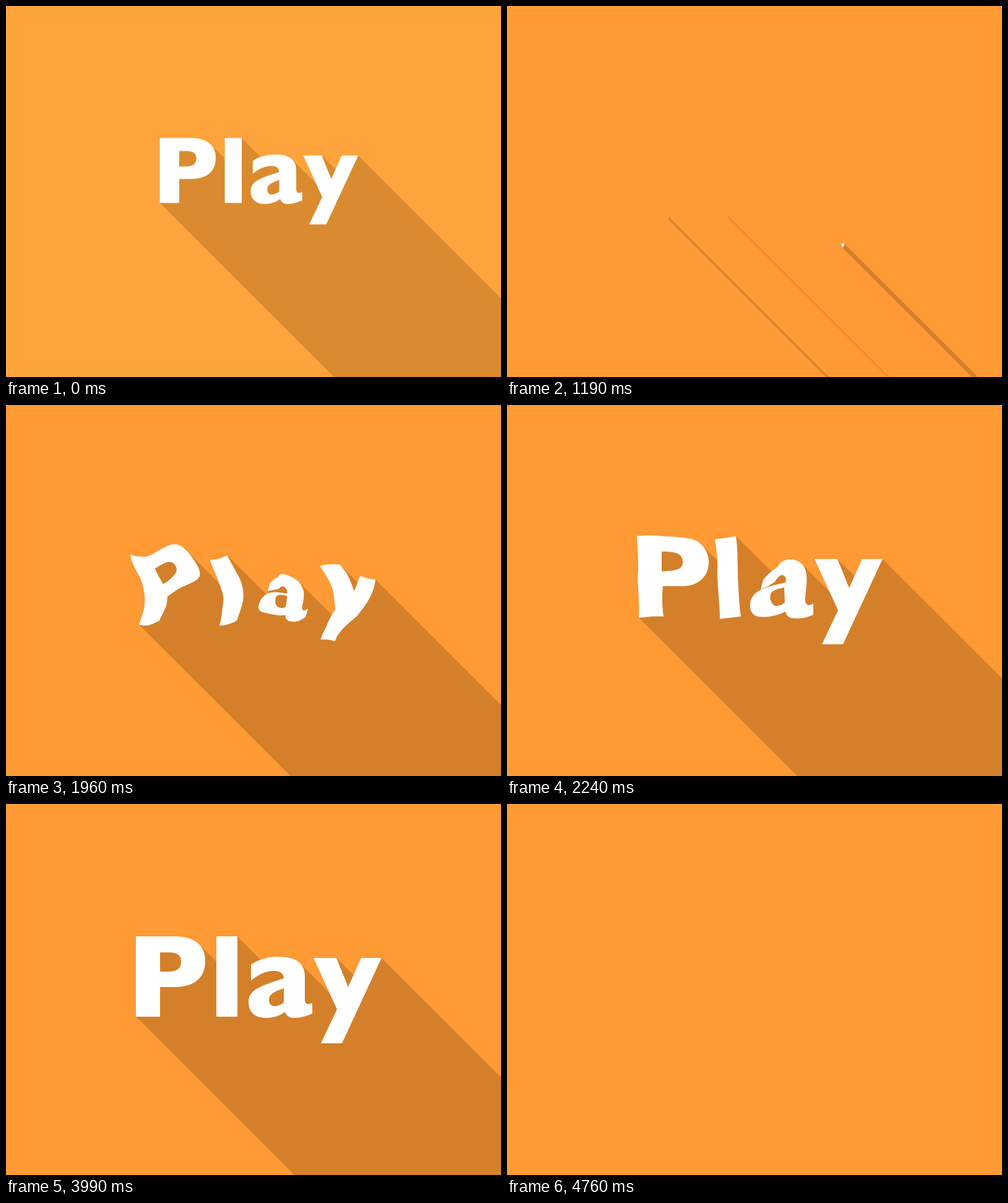
Write an HTML page with a canvas that moves like this. It is 800x600 px and loops after 5250 ms.

```html
<!DOCTYPE html>
<html lang="en">
<head>
<meta charset="utf-8">
<title>Play</title>
<style>
html, body { margin: 0; width: 100%; height: 100%; overflow: hidden; background: #ff9a35; }
canvas { display: block; }
</style>
</head>
<body>
<canvas id="stage" width="800" height="600" role="img" aria-label="Play"></canvas>
<script>
const ctx = document.getElementById('stage').getContext('2d');
const LOOP = 5250, STEP = 70, SAMPLES = 400, REACH = 800;

// Finished outlines; "|" separates the contours of one letter.
const P = 'M210 214H272C304 214 322 228 322 254C322 282 303 296 272 296H249V344H210Z' +
  '|M249 240H262C276 240 283 244 283 255C283 266 276 271 262 271H249Z';
const L = 'M340 214H374V344H340Z';
const A = 'M396 260C408 251 425 247 440 247C470 247 483 258 483 280V316C483 324 487 325 495 322V339' +
  'C485 343 476 346 467 346C458 346 453 343 451 336C442 343 431 346 420 346C402 346 392 336 392 321' +
  'C392 302 405 296 449 282C448 273 443 270 433 270C420 270 407 276 396 286Z' +
  '|M449 298C431 304 425 309 425 317C425 323 429 327 434 327C440 327 445 324 449 321Z';
const Y = 'M497 249H534L553 296L574 249H607L543 387H509L535 332Z';

// Poses of each letter: [time, outline, ease-out towards it, wobble on the way]
const letters = [
  [
    [1190, 'M259 339L260.5 342L260 344Z|M260 341h.01v.01Z'],
    [1680, 'M215 309L221 304L225 306C228 297 236 292 245 293C255 294 261 301 260 309C259 314 257 316 256 318' +
      'C256 324 250 326 245 327C242 330 241 333 242 335C246 336 248 336 251 338C250 342 246 343 241 346L243 354' +
      'C232 354 220 348 216 337C216 332 217 329 219 326C216 323 215 318 215 314Z' +
      '|M230 315C231 309 236 305 240 306C244 308 244 314 241 319C238 323 233 325 231 321Z'],
    [2240, 'M210 212C225 210 240 211 250 212C268 213 285 214 294 216C313 218 326 236 326 254C326 278 308 293 284 293' +
      'L252 293C250 310 251 328 253 342C240 341 226 343 213 344C214 320 212 295 211 280C213 258 211 235 210 212Z' +
      '|M250 237C262 237 285 237 284 254C284 268 268 268 250 269Z', 1, 11],
    [2800, P, 1, 3]
  ], [
    [1190, 'M355 339.5L357 340V341Z'],
    [1680, 'M341 321C344 314 350 311 357 311C363 311 368 315 370 319C375 321 377 325 377 334C377 345 375 354 373 362' +
      'C368 359 362 355 359 349C355 349 351 355 347 356L348 346L335 341C337 336 339 329 341 321Z'],
    [2240, 'M336 217C348 216 360 214 370 212C374 240 372 270 374 295C375 315 376 330 378 342L344 346' +
      'C344 320 340 295 340 270C341 250 338 232 336 217Z', 1, 9],
    [2800, L, 1, 3]
  ], [
    [1400, 'M441 338h.01v.01Z|M441 338h.01v.01Z'],
    [1680, 'M430 338C431 330 436 327 441 327C445 327 448 329 449 331L453 337C452 341 449 341 448 344' +
      'C444 349 440 350 436 348C431 347 430 342 430 338Z|M441 338h.01v.01Z'],
    [2240, 'M414 283C420 275 428 268 437 262C440 255 450 248 460 250C475 251 483 262 484 275C486 290 481 305 482 318' +
      'C484 325 490 325 495 321V339C485 344 475 346 465 345C457 345 452 342 450 334C446 336 440 339 434 340' +
      'C425 343 410 344 402 341C394 337 391 328 394 316C397 307 404 302 410 299C425 292 438 290 450 287' +
      'C452 280 450 276 445 275C440 275 436 281 433 286C426 290 420 295 410 298Z' +
      '|M448 295C440 297 428 299 426 306C424 314 427 322 434 325C440 325 445 323 449 319Z', 1, 8],
    [2800, A, 1, 3]
  ], [
    [1190, 'M540 384H545V387L542 391Z'],
    [1680, 'M541 305C548 307 559 308 570 303C568 318 562 328 558 340L564 349C560 352 558 353 558 357' +
      'C557 372 549 387 545 399C537 398 533 394 527 396L515 397C520 384 530 372 534 361C527 360 522 353 522 345' +
      'C523 335 530 331 535 329C535 321 540 314 541 305Z'],
    [2240, Y, 1, 6],
    [2800, 'M493 252C506 251 518 250 529 248C536 265 545 280 553 295C562 278 570 263 576 249H607' +
      'C600 265 595 278 589 290C572 325 560 355 545 387L511 388C518 370 528 350 535 332C527 305 508 278 493 252Z', 1],
    [3990, Y]
  ]
];

// Outline string -> contours of evenly spaced points
function sample(outline) {
  return outline.split('|').map(d => {
    const path = document.createElementNS('http://www.w3.org/2000/svg', 'path');
    path.setAttribute('d', d);
    const len = path.getTotalLength();
    return Array.from({ length: SAMPLES }, (_, i) => {
      const p = path.getPointAtLength(len * i / SAMPLES);
      return [p.x, p.y];
    });
  });
}
for (const keys of letters) for (const key of keys) key[1] = sample(key[1]);

function contoursAt(keys, t) {
  if (t < keys[0][0]) return [];
  const i = keys.findIndex(k => k[0] > t);
  if (i < 0) return keys[keys.length - 1][1];
  const [t0, from] = keys[i - 1], [t1, to, ease, wobble = 0] = keys[i];
  const u = (t - t0) / (t1 - t0), v = ease ? u * (2 - u) : u;
  const amp = wobble * Math.sin(Math.PI * u);
  return to.map((contour, c) => contour.map(([x1, y1], n) => {
    const [x0, y0] = from[c][n];
    const x = x0 + (x1 - x0) * v, y = y0 + (y1 - y0) * v;
    return [x + amp * Math.sin(y / 23 + 1), y + amp * Math.sin(x / 19 + 2)];
  }));
}

function polygon(points) {
  points.forEach(([x, y], i) => i ? ctx.lineTo(x, y) : ctx.moveTo(x, y));
  ctx.closePath();
}

// Sweeps every edge down the diagonal, all quads wound the same way.
function drawShadow(contours, color) {
  ctx.beginPath();
  for (const pts of contours) pts.forEach((a, i) => {
    let b = pts[(i + 1) % pts.length];
    if (b[0] - a[0] < b[1] - a[1]) [a, b] = [b, a];
    polygon([a, b, [b[0] + REACH, b[1] + REACH], [a[0] + REACH, a[1] + REACH]]);
  });
  ctx.fillStyle = color;
  ctx.fill();
}

function drawWord(contours, shadow) {
  drawShadow(contours, shadow);
  ctx.beginPath();
  contours.forEach(polygon);
  ctx.fillStyle = '#fff';
  ctx.fill('evenodd');
}

function fillStage(color) {
  ctx.fillStyle = color;
  ctx.fillRect(0, 0, 800, 600);
}

function draw(t) {
  const intro = t < 350;
  fillStage(intro ? '#ffa43c' : '#ff9a35');
  if (t >= 4760) return;
  const contours = letters.flatMap(keys => contoursAt(keys, intro ? LOOP : t));
  if (intro) {
    ctx.save();
    ctx.translate(248.5, 213.5);
    ctx.scale(0.808, 0.808);
    ctx.translate(-210, -214);
    drawWord(contours, '#da8b2f');
    ctx.restore();
    return;
  }
  drawWord(contours, '#d4802a');
  if (t > 3990) {
    ctx.globalAlpha = (t - 3990) / 770;
    fillStage('#ff9a35');
    ctx.globalAlpha = 1;
  }
}

let shown = -1;
function tick(now) {
  const t = Math.floor(now % LOOP / STEP) * STEP;
  if (t !== shown) draw(shown = t);
  requestAnimationFrame(tick);
}
draw(0);
requestAnimationFrame(tick);
</script>
</body>
</html>
```
